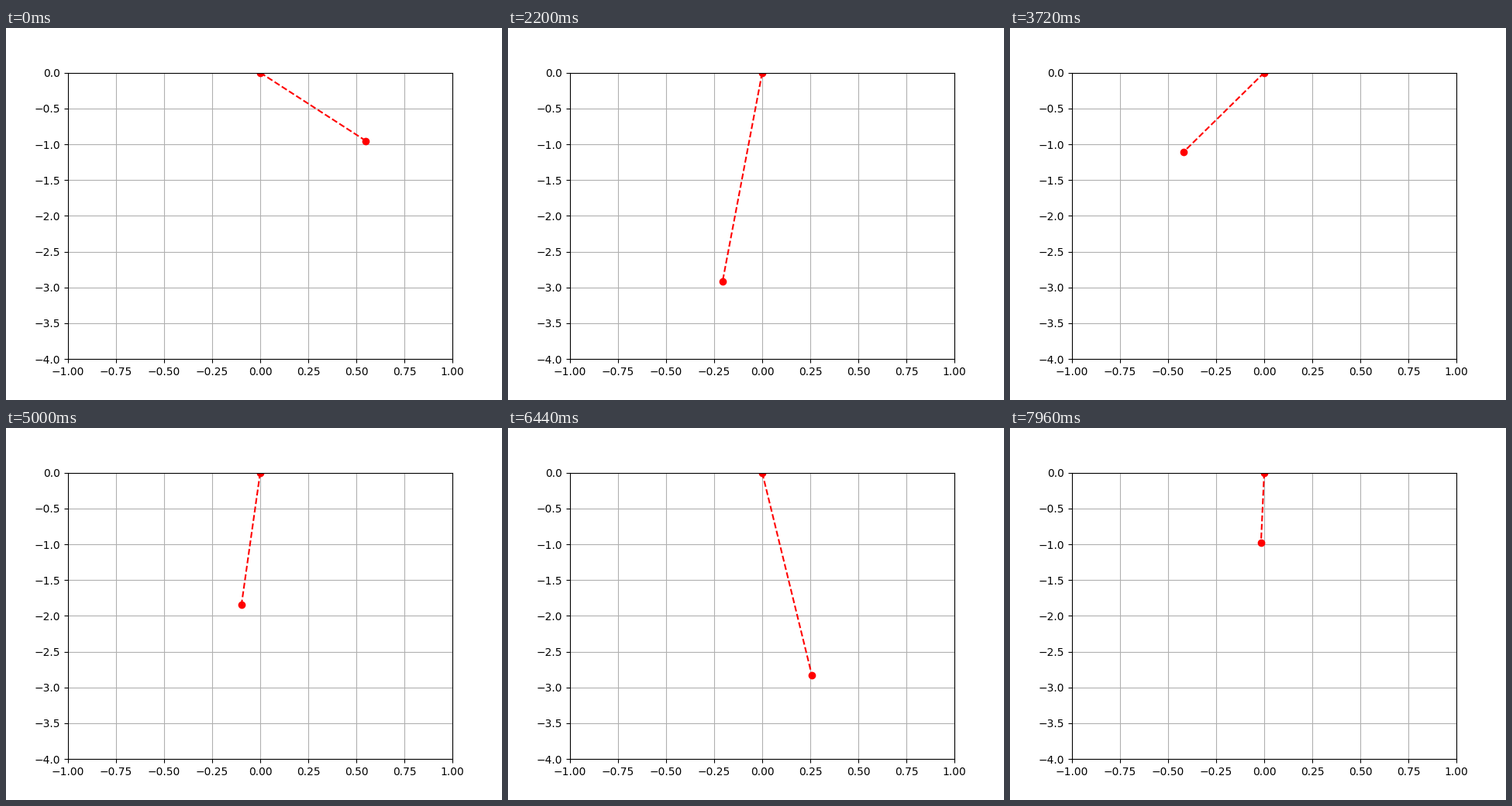
A matplotlib script that plays this animation: 640x480 px, repeating every 8000 ms.

```python
import numpy as np
import matplotlib.pyplot as plt
from matplotlib.animation import FuncAnimation

FRAMES, INTERVAL = 200, 40
G, K, M, REST = 9.81, 10.0, 1.0, 1.0
DT, SUBSTEPS = 0.02, 10


def deriv(s):
    """Elastic pendulum in Cartesian coordinates, hung from the origin."""
    pos, vel = s[:2], s[2:]
    r = np.hypot(*pos)
    acc = -K / M * (1 - REST / r) * pos - np.array([0, G])
    return np.concatenate([vel, acc])


def rk4(s, h):
    a = deriv(s)
    b = deriv(s + h / 2 * a)
    c = deriv(s + h / 2 * b)
    d = deriv(s + h * c)
    return s + h / 6 * (a + 2 * b + 2 * c + d)


def solve(length, angle):
    s = np.array([length * np.sin(angle), -length * np.cos(angle), 0, 0])
    path = [s[:2]]
    for _ in range(FRAMES - 1):
        for _ in range(SUBSTEPS):
            s = rk4(s, DT / SUBSTEPS)
        path.append(s[:2])
    return np.array(path)


path = solve(1.1, np.pi / 6)

fig, ax = plt.subplots(figsize=(6.4, 4.8), dpi=100)
ax.set_xlim(-1, 1)
ax.set_ylim(-4, 0)
ax.grid()
spring, = ax.plot([], [], "ro--")


def update(i):
    x, y = path[i]
    spring.set_data([0, x], [0, y])
    return spring,


anim = FuncAnimation(fig, update, frames=FRAMES, interval=INTERVAL,
                     repeat=True, repeat_delay=0)
plt.show()
```
